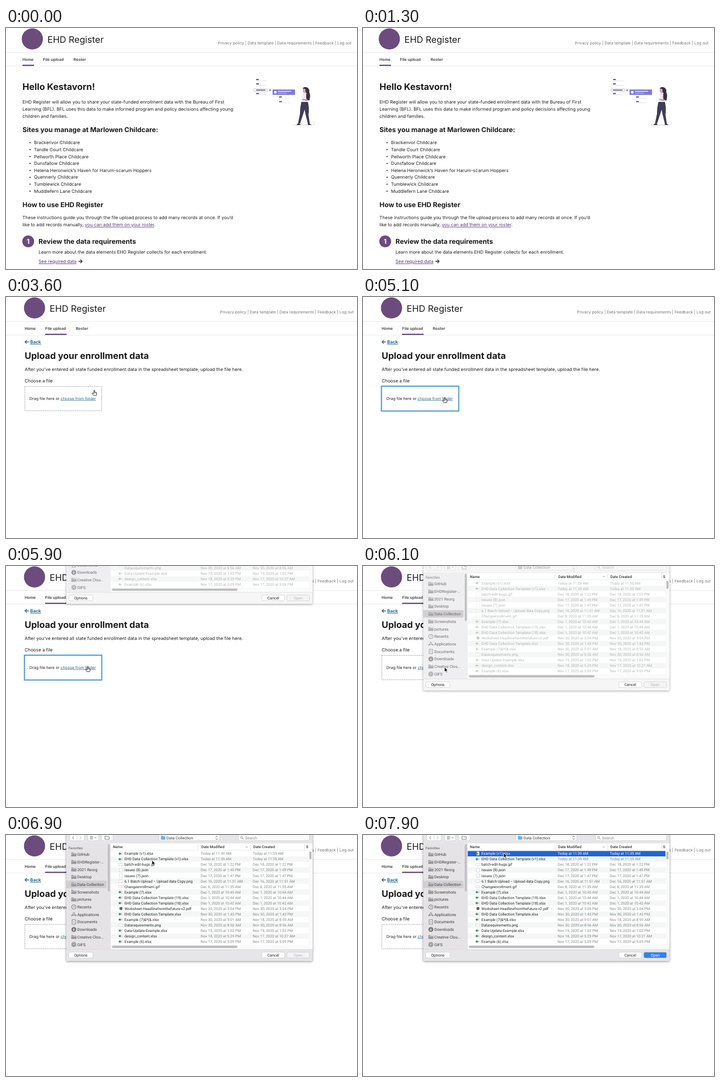
Write an HTML page that moves like this. It is 640x440 px and loops after 8000 ms.

```html
<!DOCTYPE html>
<html lang="en">
<head>
<meta charset="utf-8">
<title>Enrollment upload</title>
<style>
html, body { margin: 0; width: 640px; height: 440px; overflow: hidden; background: #fff; }
svg { display: block; }
text { white-space: pre; text-rendering: geometricPrecision; font-family: Inter, sans-serif; }
#sheet text { font-family: Roboto, sans-serif; }
.link { text-decoration: underline; text-decoration-thickness: .6px; text-underline-offset: 1px; }
#sheet { --chrome: #e6e5e7; --side: #e5e3e6; --shade: .45; }
#sheet.idle { --chrome: #f6f6f6; --side: #efeef0; --shade: .35; }
#sheet { filter: drop-shadow(0 1px 2px rgba(0, 0, 0, var(--shade))); }
.idle #tools { opacity: .5; filter: grayscale(1); }
.idle #places { opacity: .72; }
.idle .name { opacity: .32; }
.idle .date { opacity: .6; }
</style>
</head>
<body>
<svg id="stage" width="640" height="440" viewBox="0 0 640 440"></svg>
<script>
const LOOP = 8000, STEP = 100;
const INK = '#202022', DARK = '#1b1b1d', PURPLE = '#6b4c7c', PLUM = '#553b78', BLUE = '#2d6890', RING = '#559dd6';

const esc = s => s.replace(/&/g, '&amp;');
const text = (x, y, size, str, fill = INK, weight = 400, extra = '') =>
  `<text x="${x}" y="${y}" font-size="${size}" fill="${fill}" font-weight="${weight}" ${extra}>${str}</text>`;
const rect = (x, y, w, h, fill, extra = '') =>
  `<rect x="${x}" y="${y}" width="${w}" height="${h}" fill="${fill}" ${extra}/>`;
const path = (d, fill, extra = '') => `<path d="${d}" fill="${fill}" ${extra}/>`;
const line = (d, color, width = 1, extra = '') =>
  path(d, 'none', `stroke="${color}" stroke-width="${width}" ${extra}`);
const circle = (x, y, r, fill, extra = '') => `<circle cx="${x}" cy="${y}" r="${r}" fill="${fill}" ${extra}/>`;
const group = (id, body) => `<g id="${id}">${body}</g>`;
const h1 = (y, s) => text(30, y, 16.4, s, DARK, 700);
const h2 = (x, y, s) => text(x, y, 12.25, s, DARK, 700);
const body = (x, y, s) => text(x, y, 8.25, s);
const link = (s, color) => `<tspan class="link" fill="${color}">${s}</tspan>`;

// Site header, shared by both pages
const header =
  circle(48, 20, 19.3, PURPLE) +
  text(75.5, 26.8, 16.5, 'EHD Register', DARK) +
  text(630, 30.2, 7.26, 'Privacy policy | Data template | Data requirements | Feedback | Log out', '#71747a', 400, 'text-anchor="end"') +
  ['Home', 'File upload', 'Roster'].map((s, i) => text([30, 67.6, 123.3][i], 59.6, 7.1, s, '#4f5155', 700)).join('');

// Small drawing at the top right of the home page
function artwork() {
  const stub = (x, y) => rect(x, y, 5, 1.7, '#3f3d56') + rect(x, y + 2.8, 19, .7, '#d3d3da');
  return stub(456, 93.3) + stub(456, 101.2) + stub(456, 118.8) + stub(498, 125) + stub(498, 133.5) +
    rect(451.5, 111, 26, 5, '#fff', 'rx="2.5" stroke="#b6b2dc" stroke-width=".8"') +
    rect(456, 112.6, 17, 1.6, '#55536c') +
    path('M480.5 111.6 L484 113.5 L480.5 115.4Z', '#6c63ff') +
    rect(486, 112.3, 41, 9.8, '#8079dc') +
    circle(491, 117.2, 2.5, '#f4f3ff') + rect(496, 115, 24, 1.3, '#f4f3ff') + rect(496, 118.3, 16, 1, '#c9c5f3') +
    '<ellipse cx="543" cy="177" rx="21" ry="1" fill="#e4e4ea"/>' +
    path('M541 110 Q544 106.5 549 108.5 Q554 111 553 117 Q556 124 553 132 Q547 132 547 124 L544 114Z', '#34323f') +
    path('M541 111 Q544 109.5 546 112 L546.5 119 L543 119 Q540.5 116 541 111Z', '#d9a5a2') +
    path('M541 119 L548 118 Q553 121 551 128 L550 137 L539.5 137 Q541 128 541 119Z', '#eceaf2') +
    path('M547 120 Q552 120 552 127 L549 133 L540 131.5 L540 129.5 L547 130Z', '#c98f8c') +
    path('M548 117 Q554 122 553.5 132 Q549 133 547.5 127Z', '#34323f') +
    path('M538.5 135 L550.5 135 Q553.5 148 551.5 158 L554 175 L550.5 175 L546 157 L544.5 149 L541 160 L536 175 L532.5 174 L536 157 Q536 145 538.5 135Z', '#3f3d56') +
    path('M532.5 174 L536.5 175.5 L537 177 L529.5 177Z M550.5 175 L554 175 L557 177 L550.5 177Z', '#2c2a38') +
    line('M561 176 L563 170 M562 174 L559.5 171', '#d7d7df', .8);
}

const sites = ['Brackenvor Childcare', 'Tandle Court Childcare', 'Pellworth Place Childcare', 'Dunsfallow Childcare',
  'Helena Heronwick’s Haven for Harum-scarum Hoppers', 'Quennerly Childcare', 'Tumblewick Childcare', 'Muddlefern Lane Childcare'];

const home =
  artwork() +
  h1(113, 'Hello Kestavorn!') +
  body(30, 138, 'EHD Register will allow you to share your state-funded enrollment data with the Bureau of First') +
  body(30, 151, 'Learning (BFL). BFL uses this data to make informed program and policy decisions affecting young') +
  body(30, 164, 'children and families.') +
  h2(30, 189.6, 'Sites you manage at Marlowen Childcare:') +
  sites.map((s, i) => circle(43.8, 209.4 + i * 12.65, 1.1, INK) + body(51, 212.2 + i * 12.65, s)).join('') +
  h2(30, 326.6, 'How to use EHD Register') +
  body(30, 349.2, 'These instructions guide you through the file upload process to add many records at once. If you’d') +
  body(30, 362.3, 'like to add records manually, ' + link('you can add them on your roster', PLUM) + '.') +
  circle(40.5, 389.5, 10.8, PURPLE) +
  text(40.4, 394, 12.3, '1', '#fff', 700, 'text-anchor="middle"') +
  h2(59.3, 394, 'Review the data requirements') +
  body(59.3, 411.5, 'Learn more about the data elements EHD Register collects for each enrollment.') +
  body(59.3, 429, link('See required data', PLUM)) +
  line('M132 426 H138.6 M135.6 422.8 L138.8 426 L135.6 429.2', '#3d2f55', 1.5);

const upload =
  line('M34 78.8 L30.6 82 L34 85.2 M30.8 82 H37.8', BLUE, 1.3) +
  text(40, 85, 8.25, link('Back', BLUE), BLUE, 700) +
  h1(113, 'Upload your enrollment data') +
  body(30, 135.2, 'After you’ve entered all state funded enrollment data in the spreadsheet template, upload the file here.') +
  body(30, 156, 'Choose a file') +
  rect(30.3, 163.3, 140, 44.4, '#fff', 'stroke="#808388" stroke-width=".8" stroke-dasharray="2 1.4"') +
  text(38.8, 187.6, 7.17, 'Drag file here or ' + link('choose from folder', BLUE));

// File dialog
const tpl = 'EHD Data Collection Template';
const files = [
  ['Example (v1).xlsx', 'Today at 11:39 AM', 'Today at 11:35 AM'],
  [tpl + ' (v1).xlsx', 'Today at 11:35 AM'],
  ['batch-edit-bugs.gif', 'Dec 18, 2020 at 1:22 PM'],
  ['issues (8).json', 'Dec 17, 2020 at 1:49 PM'],
  ['issues (7).json', 'Dec 17, 2020 at 1:47 PM'],
  ['6.1 Batch Upload – Upload data Copy.png', 'Dec 16, 2020 at 11:51 AM'],
  ['Changeenrollment.gif', 'Dec 8, 2020 at 11:35 AM'],
  ['Example (7).xlsx', 'Dec 1, 2020 at 10:45 AM', 'Dec 1, 2020 at 10:44 AM'],
  [tpl + ' (19).xlsx', 'Dec 1, 2020 at 10:44 AM'],
  [tpl + ' (18).xlsx', 'Dec 1, 2020 at 10:42 AM'],
  ['Worksheet-Headlinefromthefuture-v2.pdf', 'Nov 30, 2020 at 3:04 PM'],
  [tpl + '.xlsx', 'Nov 30, 2020 at 1:43 PM'],
  ['Example (7)&*(&.xlsx', 'Nov 30, 2020 at 9:01 AM', 'Nov 18, 2020 at 8:59 AM'],
  ['Datarequirements.png', 'Nov 30, 2020 at 8:56 AM'],
  ['Data-Update-Example.xlsx', 'Nov 19, 2020 at 1:02 PM'],
  ['design_content.xlsx', 'Nov 18, 2020 at 5:29 PM', 'Nov 17, 2020 at 10:27 AM'],
  ['Example (6).xlsx', 'Nov 17, 2020 at 5:09 PM']];
const folders = ['GitHub', 'EHDRegister-...', '2021 Reorg', 'Desktop', 'Data Collection', 'Screenshots', 'pictures',
  'Recents', 'Applications', 'Documents', 'Downloads', 'Creative Clou...', 'GIFS'];
const rowY = i => 34 + i * 10.03;

function fileIcon(name, y) {
  if (name.endsWith('xlsx'))
    return rect(207.3, y - 3.2, 4.6, 6.2, '#fff', 'stroke="#cdd2d0" stroke-width=".5"') + rect(205.6, y - 1.5, 3.8, 3.2, '#4c7f6c') +
      rect(209.6, y - 1, 1.8, 2.2, '#9dbdb0');
  if (name.endsWith('pdf')) return rect(207.3, y - 2.4, 4.6, 4.6, '#2a2a2a') + rect(208.8, y - .9, 1.6, 1.6, '#fff');
  const wide = name.endsWith('json') ? 0 : 1;
  return rect(206.8 - wide, y - 3.2 + wide, 5.4 + wide * 2, 6.6 - wide * 2, '#fff', 'stroke="#c4c4c4" stroke-width=".6"');
}

function folderIcon(i, y) {
  const ic = '#77777b';
  if (i === 7 || i === 10 || i === 12)
    return circle(123.7, y, 4, i === 10 ? ic : 'none', `stroke="${ic}" stroke-width="1"`) +
      (i === 10 ? line(`M123.7 ${y - 2.3} v4 m-1.8 -1.6 l1.8 1.8 l1.8 -1.8`, '#fff', .9)
        : i === 7 ? line(`M123.7 ${y - 2.4} v2.6 h2`, ic, .8) : circle(123.7, y, 2, 'none', `stroke="${ic}" stroke-width="1.2"`));
  if (i === 8) return line(`M119.8 ${y + 3.5} L123.7 ${y - 3.8} L127.6 ${y + 3.5} M119 ${y + 1.3} H128.5`, ic, 1);
  if (i === 9) return rect(120.6, y - 4, 6.2, 8, '#f2f1f3', `stroke="${ic}" stroke-width=".9"`) + line(`M122 ${y - 1} h3.4 m-3.4 2 h3.4`, ic, .6);
  return path(`M119 ${y - 3.5} h3.5 l1 1 h5 v6 h-9.5Z`, '#98989c') + line(`M119 ${y - 1.3} h9.5`, '#ececee', .7);
}

const button = (x, w, s, id) => group(id, rect(x, 214, w, 10.4, '#fff', 'rx="2.4" stroke="#c6c5c7" stroke-width=".6"') +
  text(x + w / 2, 221.7, 7.1, s, '#222', 400, 'text-anchor="middle"'));
const box = (x, w) => rect(x, -6, w, 16.4, '#fbfbfb', 'rx="2.4" stroke="#c4c3c5" stroke-width=".6"');
const label = (x, s) => text(x, 24.3, 6.75, s, '#333', 500);

const tools =
  box(116, 27) + line('M129.5 -6 V10.4', '#d6d5d7', .6) + line('M123.8 2.2 L121.4 5 L123.8 7.8', '#777', .9) + line('M134.8 2.2 L137.2 5 L134.8 7.8', '#b5b5b5', .9) +
  box(149, 20) + line('M153 2.8 h5.6 m-5.6 2.2 h5.6 m-5.6 2.2 h5.6', '#666', .8) + line('M161.5 4.2 l1.7 1.7 l1.7 -1.7', '#666', .8) +
  box(174, 21) + line('M180.5 2.2 h2.5 l1 1 h4.2 v4.8 h-7.7Z', '#666', .8) +
  box(279, 111) + path('M282.5 1.6 h3 l1 1 h4 v6 h-8Z', '#68b1e4') + text(292.5, 7.5, 7.2, 'Data Collection', '#444') +
  line('M382.3 3.8 l1.7 -1.9 l1.7 1.9 m-3.4 2.6 l1.7 1.9 l1.7 -1.9', '#555', .8) +
  box(424, 129.5) + circle(429.6, 4.6, 1.9, 'none', 'stroke="#777" stroke-width=".7"') + line('M431 6 l1.9 2', '#777', .8) +
  text(436, 7.5, 7.2, 'Search', '#8f8f8f');

const sheet =
  rect(110, -40, 448.6, 270, 'var(--chrome)') +
  rect(110, 14.6, 80.5, 194.4, 'var(--side)') +
  group('tools', tools) +
  rect(110, 83.3, 73.3, 13.6, '#d1cfd3') +
  group('places', text(114, 25.8, 6.3, 'Favorites', '#6d6c70', 500) +
    folders.map((s, i) => folderIcon(i, 35.5 + i * 13.7) + text(130, 38.1 + i * 13.7, 7.2, s, '#3a3a3d')).join('')) +
  rect(185.6, 17, 3.6, 86, '#c1bfc3', 'rx="1.8"') +
  rect(191, 14.8, 367.6, 194, '#fff') +
  line('M191 15 H558.6 M191 27.8 H558.6', '#dcdcdd', .6) + line('M350 16.5 V26.5 M446.3 16.5 V26.5 M544.5 16.5 V26.5', '#cfcfd0', .6) +
  label(195, 'Name') + label(356, 'Date Modified') + label(451, 'Date Created') + label(547, 'S') +
  line('M437.3 21 l1.8 1.8 l1.8 -1.8', '#777', .8) +
  files.map((f, i) => i % 2 ? rect(191, rowY(i) - 5, 361, 10, '#f5f6f6') : '').join('') +
  group('picked', rect(191, 29.2, 360.5, 9.8, '#2064d8')) +
  files.map(([name, mod, made = mod], i) =>
    `<g class="name">${fileIcon(name, rowY(i))}${text(216, rowY(i) + 2.4, 6.72, esc(name), '#222')}</g>` +
    `<g class="date">${text(355, rowY(i) + 2.4, 6.72, mod, '#858588')}${text(450, rowY(i) + 2.4, 6.72, made, '#858588')}</g>`).join('') +
  rect(191, 200.2, 367.6, 8.6, '#fafafa') + rect(193, 202, 229, 4.2, '#bcbcbe', 'rx="2.1"') +
  rect(552, 28, 6.6, 172, '#fafafa') + rect(553.2, 30, 3.8, 14.5, '#bcbcbe', 'rx="1.9"') +
  line('M110 209 H558.6', '#d4d3d5', .6) +
  button(114.5, 44, 'Options', 'options') + button(466.5, 41.5, 'Cancel', 'cancel') + button(512, 41.5, 'Open', 'open');

const arrow = path('M0 0 V9 L2.1 7.1 L3.6 10.4 L5.1 9.7 L3.7 6.6 H6.4Z', '#111', 'stroke="#fff" stroke-width=".8"');
const hand = path('M-.9 -4.4 Q0 -5.4 .8 -4.4 V-1.2 L3.6 -.7 Q4.6 -.3 4.5 .8 L3.8 4.8 H-1.6 L-4 1.2 Q-4.2 0 -3 .1 L-.9 1.6Z', '#fff',
  'stroke="#222" stroke-width=".9" stroke-linejoin="round"') + line('M.9 -1 V1.2 M2.3 -.8 V1.2 M3.5 -.6 V1.2', '#444', .5);

const stage = document.getElementById('stage');
stage.innerHTML = rect(0, 0, 640, 440, '#fff') +
  line('M0 44.5 H640 M0 69.5 H640', '#e9e9ea', 1) +
  group('page', header +
    group('homeTab', rect(30, 67, 21, 2.3, PURPLE)) + group('fileTab', rect(67.3, 67, 39.2, 2.3, PURPLE)) +
    group('home', home) + group('upload', upload) +
    group('tabRing', rect(58.3, 43.8, 57.8, 26.8, 'none', `stroke="${RING}" stroke-width="2.2"`)) +
    group('dropRing', rect(29.6, 162.8, 141, 45.4, 'none', `stroke="${RING}" stroke-width="2.1"`))) +
  group('sheet', sheet) + group('arrow', arrow) + group('hand', hand);

const $ = id => document.getElementById(id);
const show = (id, on) => { $(id).style.display = on ? '' : 'none'; };
const move = (id, x, y) => $(id).setAttribute('transform', `translate(${x} ${y})`);
const ease = x => { x = Math.min(1, Math.max(0, x)); return x * x * (3 - 2 * x); };
const firstTexts = ['.name', '.date'].flatMap(c => [...stage.querySelector(c).querySelectorAll('text')]);
const plainFills = firstTexts.map(e => e.getAttribute('fill'));

// Pointer stops: time, x, y
const stops = [[1900, 300, 3], [2300, 88, 61], [3000, 88, 61], [3500, 161, 172], [3600, 161, 175], [3900, 149, 188],
  [6000, 149, 188], [6100, 148.5, 184.5], [6600, 148.5, 184.5], [6700, 152, 174], [6900, 266, 46], [7000, 277, 42], [7400, 256.5, 32.5]];

function pointer(t) {
  const i = stops.findIndex(s => s[0] > t);
  if (i < 0) return stops[stops.length - 1].slice(1);
  const [a, b] = [stops[Math.max(0, i - 1)], stops[i]];
  const k = ease((t - a[0]) / (b[0] - a[0]));
  return [a[1] + (b[1] - a[1]) * k, a[2] + (b[2] - a[2]) * k];
}

function draw(t) {
  const uploading = t >= 2600, picked = t >= 7900;
  move('page', uploading ? 4 : 0, 0);
  show('home', !uploading);
  show('upload', uploading);
  show('homeTab', !uploading);
  show('fileTab', t >= 2300);
  show('tabRing', t >= 2400 && !uploading);
  show('dropRing', t >= 5100 && t < 6100);

  show('sheet', t > 5800);
  move('sheet', 0, -245 * (1 - ease((t - 5755) / 368)));
  $('sheet').classList.toggle('idle', t < 6400);
  show('picked', picked);
  firstTexts.forEach((e, i) => e.setAttribute('fill', picked ? '#fff' : plainFills[i]));
  const [face, caption] = $('open').children;
  face.setAttribute('fill', picked ? '#2f80f0' : '#f4f3f5');
  caption.setAttribute('fill', picked ? '#fff' : '#b9b8bb');

  const [x, y] = pointer(t);
  const pointing = (t >= 2300 && t < 3100) || (t >= 3500 && t < 6100);
  move('arrow', x, y);
  move('hand', x, y);
  show('arrow', t >= 1900 && !pointing);
  show('hand', pointing);
}

const start = performance.now();
function tick() {
  const t = Math.max(0, performance.now() - start) % LOOP;
  draw(Math.floor(t / STEP) * STEP);
  requestAnimationFrame(tick);
}
draw(0);
requestAnimationFrame(tick);
</script>
</body>
</html>
```
